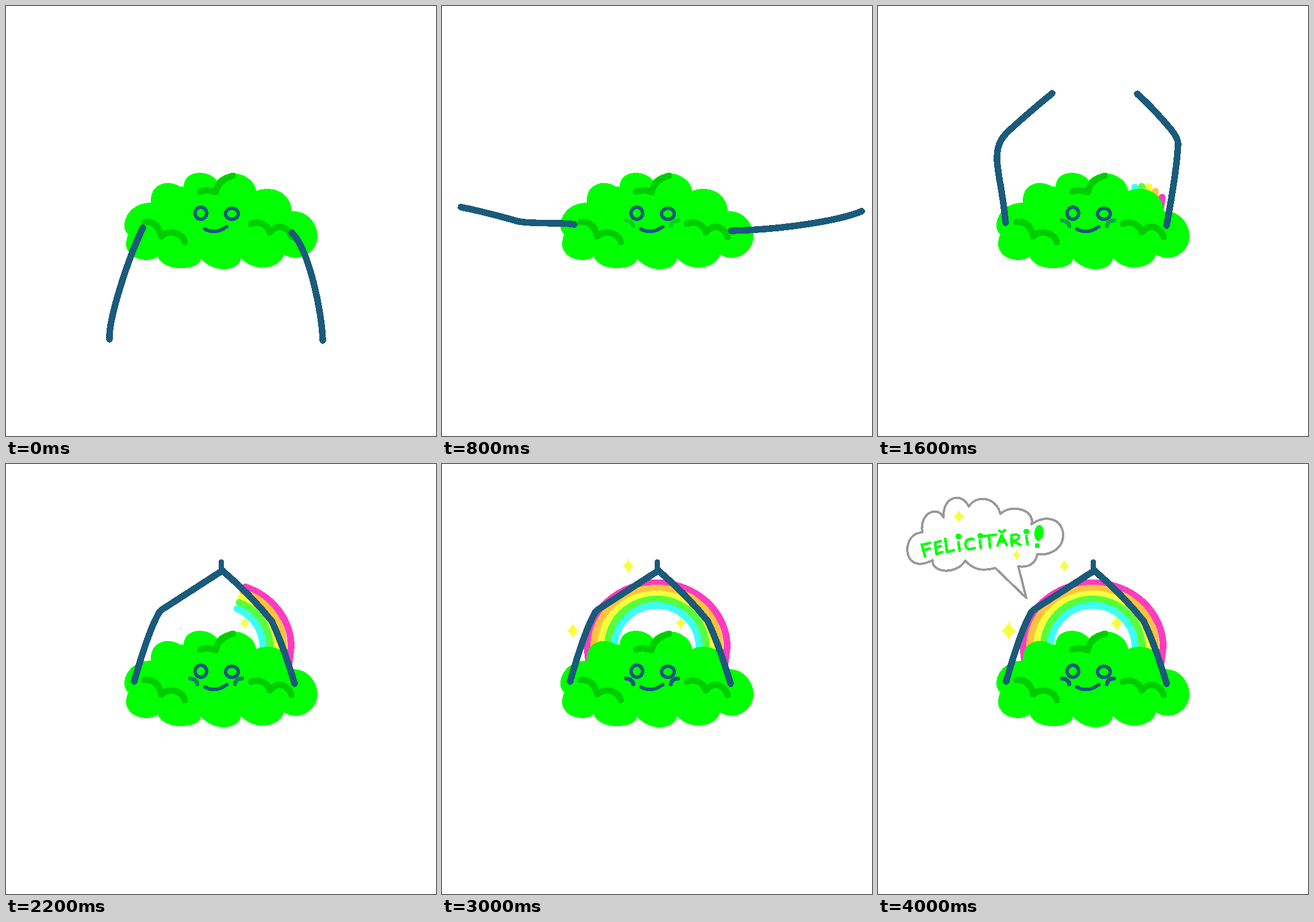
Write an HTML page that moves like this. It is 748 by 748 pixels and loops after 10 s.

```html
<!DOCTYPE html>
<html lang="ro">
<head>
<meta charset="utf-8">
<title>Felicitări!</title>
<style>
  html, body { margin: 0; width: 100%; height: 100%; overflow: hidden; background: #fff; }
  svg { display: block; width: 100%; height: 100%; shape-rendering: crispEdges; }
  .cloud { fill: #0f0; }
  .line { fill: none; stroke: #1a5a7a; stroke-width: 6; stroke-linecap: round; stroke-linejoin: round; }
  .fold { fill: none; stroke: #00cd00; stroke-width: 11; stroke-linecap: round; stroke-linejoin: round; }

  /* Every animation shares one 10 s loop, redrawn in 200 ms steps */
  .arms, .rest, .cheeks, .bow path, .star, .bubble {
    animation: 10s step-end infinite;
  }

  .arms path, .rest path { stroke-width: 11.5; }
  .arms { animation-name: flash; animation-delay: calc(var(--i) * .2s - 10s); }
  @keyframes flash { 0% { opacity: 1 } 2%, 100% { opacity: 0 } }

  .rest { animation-name: rest; }
  @keyframes rest { 0% { opacity: 0 } 18%, 100% { opacity: 1 } }

  .cheeks { animation-name: blush; }
  .cheeks path { stroke-width: 7; }
  @keyframes blush {
    0% { opacity: 0; animation-timing-function: steps(15) }
    30%, 100% { opacity: 1 }
  }

  .bow path {
    fill: none; stroke-width: 12; stroke-linecap: round;
    stroke-dasharray: 100 300; animation-name: grow;
  }
  @keyframes grow {
    0% { opacity: 0; stroke-dashoffset: 100 }
    16% { opacity: 1; stroke-dashoffset: var(--s) }
    18% { opacity: 1; stroke-dashoffset: 80 }
    20% { opacity: 1; stroke-dashoffset: 69 }
    22% { opacity: 1; stroke-dashoffset: 60 }
    24% { opacity: 1; stroke-dashoffset: 38 }
    26% { opacity: 1; stroke-dashoffset: 15 }
    28%, 100% { opacity: 1; stroke-dashoffset: 0 }
  }

  .star { fill: #f6ff3c; }
  .right { animation-name: right; }
  .top { animation-name: top; }
  .left { animation-name: left; }
  @keyframes right {
    0% { transform: scale(0) }
    22% { transform: scale(10.5) }
    24% { transform: scale(13) }
    26% { transform: scale(12) }
    28%, 30% { transform: scale(11) }
    34% { transform: scale(10) }
    38%, 100% { transform: scale(13.5) }
  }
  @keyframes top {
    0% { transform: scale(0) }
    24% { transform: scale(14) }
    26% { transform: scale(17) }
    28% { transform: scale(15) }
    30% { transform: scale(13) }
    34% { transform: scale(12) }
    38%, 100% { transform: scale(11) }
  }
  @keyframes left {
    0% { transform: scale(0) }
    26% { transform: scale(9) }
    28% { transform: scale(11) }
    30% { transform: scale(13.5) }
    34% { transform: scale(15) }
    38%, 100% { transform: scale(17) }
  }

  .bubble { animation-name: speak; }
  @keyframes speak { 0% { opacity: 0 } 40%, 100% { opacity: 1 } }
  .letters { fill: none; stroke: #0f0; stroke-width: 4.5; stroke-linecap: round; stroke-linejoin: round; }
  .dots { fill: #0f0; }
</style>
</head>
<body>
<svg viewBox="0 0 748 748">
  <defs>
    <path id="spark" d="M0-1Q.22-.28 .78 0Q.22 .28 0 1Q-.22 .28-.78 0Q-.22-.28 0-1Z"/>
  </defs>

  <g class="bow">
    <path pathLength="100" style="--s:96" stroke="#ff3cc0" d="M492 350L496 318A122 111 0 0 0 252 318L256 350"/>
    <path pathLength="100" style="--s:93" stroke="#ffc23c" d="M480 350L483 318A109.5 102 0 0 0 264 318L267 350"/>
    <path pathLength="100" style="--s:90" stroke="#f6ff3c" d="M470 350L471 318A97.5 92 0 0 0 276 318L277 350"/>
    <path pathLength="100" style="--s:89" stroke="#56ff3c" d="M459 350V318A85.5 83 0 0 0 288 318V350"/>
    <path pathLength="100" style="--s:88" stroke="#3cfff2" d="M447 350V318A73.5 72 0 0 0 300 318V350"/>
  </g>

  <path class="cloud" d="M252 342C250 318 266 308 281 308Q294 308 302 314Q306 313 309 315C309 298 322 290 338 290Q356 291 367 303Q380 291 396 291C418 292 435 308 435 322Q443 318 456 318C480 318 497 336 497 357C522 355 542 376 542 401C542 421 524 438 505 438Q493 438 483 432C481 446 465 455 445 455Q422 454 409 438C408 450 395 458 378 458Q354 457 339 439C339 450 323 456 305 456C284 456 267 448 264 435Q258 442 243 442C222 441 209 429 209 414Q209 404 213 397C207 393 205 386 206 379C208 358 227 342 252 342Z"/>
  <g class="fold">
    <path d="M241 376Q264 373 270 401Q278 393 290 394Q308 397 311 411"/>
    <path d="M426 379C440 373 455 380 459 394Q468 383 478 384Q492 387 497 402"/>
    <path d="M338 323Q350 318 365 324Q368 303 395 295"/>
  </g>

  <g class="line">
    <ellipse cx="339" cy="360.5" rx="10" ry="10.5"/>
    <ellipse cx="393" cy="361.5" rx="11" ry="9.5"/>
    <path d="M346 388Q364 398 384 384"/>
    <g class="cheeks">
      <path d="M320 373Q331 374 333 383"/>
      <path d="M398 383Q400 373 411 373"/>
    </g>
    <g class="arms" style="--i:0">
      <path d="M238 386C212 440 178 545 180 580"/>
      <path d="M497 394C528 425 550 535 551 582"/>
    </g>
    <g class="arms" style="--i:1">
      <path d="M238 385C205 435 145 510 125 561"/>
      <path d="M498 393C535 425 592 515 603 561"/>
    </g>
    <g class="arms" style="--i:2">
      <path d="M234 383C200 420 120 470 93 531"/>
      <path d="M500 392C540 410 615 470 640 531"/>
    </g>
    <g class="arms" style="--i:3">
      <path d="M232 381C180 400 90 395 35 433"/>
      <path d="M502 391C570 395 680 405 727 433"/>
    </g>
    <g class="arms" style="--i:4">
      <path d="M230 380C215 376 150 380 130 374S60 355 33 350"/>
      <path d="M503 391C590 389 690 374 730 357"/>
    </g>
    <g class="arms" style="--i:5">
      <path d="M228 378C170 365 75 340 36 284"/>
      <path d="M502 388C580 380 665 340 703 284"/>
    </g>
    <g class="arms" style="--i:6">
      <path d="M224 374C180 348 130 327 103 297Q82 274 68 237"/>
      <path d="M502 384C530 379 545 366 555 356Q615 305 639 238"/>
    </g>
    <g class="arms" style="--i:7">
      <path d="M222 376C185 320 125 255 185 169"/>
      <path d="M502 383C540 325 600 255 545 169"/>
    </g>
    <g class="arms" style="--i:8">
      <path d="M222 377C217 320 207 290 207 265S215 228 232 213Q265 183 303 152"/>
      <path d="M502 382Q520 285 522 240Q522 230 510 215Q478 177 451 153"/>
    </g>
    <g class="rest">
      <path d="M223 378Q248 290 266 259Q268 255 278 249L374 187"/>
      <path d="M502 382Q481 312 462 273Q426 228 376 185"/>
      <path style="stroke-width:9" d="M374.500 186V170"/>
    </g>
  </g>

  <g transform="translate(415 277)"><use href="#spark" class="star right"/></g>
  <g transform="translate(324 177.500)"><use href="#spark" class="star top"/></g>
  <g transform="translate(227.500 290)"><use href="#spark" class="star left"/></g>

  <g class="bubble" role="img" aria-label="Felicitări!">
    <path fill="#fff" stroke="#999" stroke-width="4" stroke-linejoin="round" d="M204 181L258 233L244 178C262 181 275 172 277 157C300 160 322 146 322 124C322 96 292 86 267 105C274 80 232 68 213 87C206 58 172 52 158 74C146 48 112 56 114 93C104 72 72 84 77 119C50 120 45 155 58 168Q72 180 95 167C92 188 135 195 152 168C165 184 182 187 204 181Z"/>
    <g fill="#f6ff3c">
      <use href="#spark" transform="translate(141 91) scale(12 11)"/>
      <use href="#spark" transform="translate(241 158) scale(9)"/>
    </g>
    <g class="letters">
      <path d="M76 140L82 161M76 141L91 137M79 150L90 147"/>
      <path d="M99 137L102 157M99 137L109 134M100 146L109 143M102 157L112 153"/>
      <path d="M117 130L120 153L132 150"/>
      <path d="M140 136L142 151"/>
      <path d="M166 131Q152 128 152 141Q155 152 168 146"/>
      <path d="M177 133L179 146"/>
      <path d="M181 126L205 123M193 125L195 145"/>
      <path d="M208 142L215 124L224 141M211 135L221 134M211 116Q216 121 221 115"/>
      <path d="M233 142L232 124Q246 120 245 128Q243 133 234 134L248 141"/>
      <path d="M258 125L260 140"/>
    </g>
    <g class="dots">
      <circle cx="140" cy="126" r="5"/>
      <circle cx="178" cy="125" r="5"/>
      <circle cx="258" cy="117.500" r="5"/>
      <ellipse cx="280" cy="120" rx="8" ry="14" transform="rotate(6 280 120)"/>
      <circle cx="277" cy="142" r="4.500"/>
    </g>
  </g>
</svg>
</body>
</html>
```
